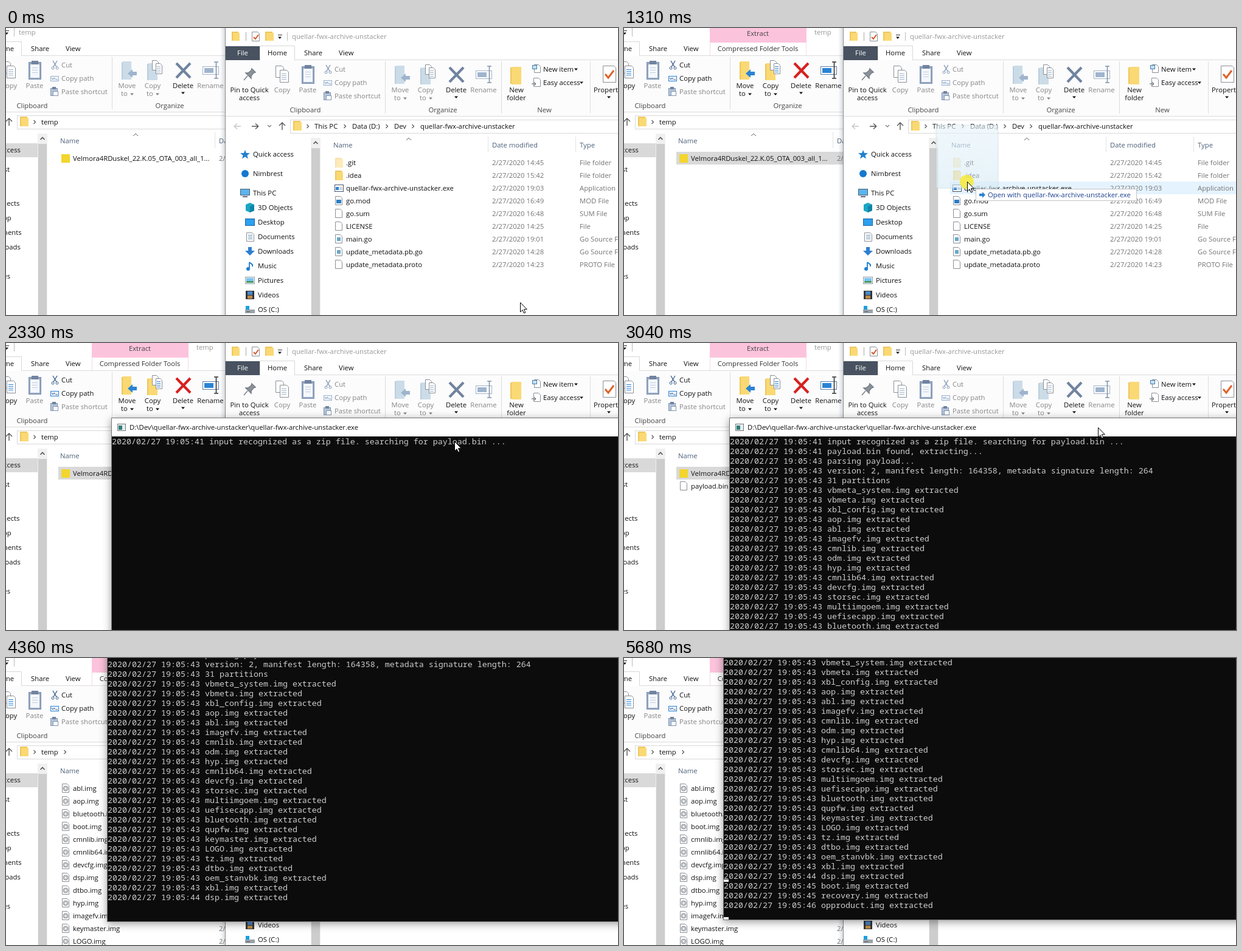
An HTML page that plays this animation: 1006 by 473 pixels, repeating every 5830 ms.

```html
<!DOCTYPE html>
<html lang="en">
<head>
<meta charset="utf-8">
<title>Payload extraction</title>
<style>
html, body { margin: 0; width: 100%; height: 100%; overflow: hidden; background: #fff; }
svg { display: block; width: 100vw; height: 100vh; }
text { font: 11.3px "Open Sans", "Noto Sans", sans-serif; white-space: pre; }
.mid { text-anchor: middle; }
.log text { font: 13.333px "Noto Sans Mono", "DejaVu Sans Mono", monospace; fill: #ccc; }
.shade { filter: drop-shadow(0 3px 7px rgba(0, 0, 0, .4)); }
</style>
</head>
<body>
<svg id="stage" viewBox="0 0 1006 473" preserveAspectRatio="none"></svg>
<script>
const LOOP = 5830, TICK = 77.5;
const INK = '#111', DIM = '#858585', BLUE = '#2b83d4', GOLD = '#fad974';
const TOOL = 'quellar-fwx-archive-unstacker';
const ZIP = 'Velmora4RDuskel_22.K.05_OTA_003_all_1...';

// Drawing helpers
const rect = (x, y, w, h, fill, more = '') =>
  `<rect x="${x}" y="${y}" width="${w}" height="${h}" fill="${fill}" ${more}/>`;
const box = (x, y, w, h, line, fill = '#fff') =>
  rect(x + .5, y + .5, w - 1, h - 1, fill, `stroke="${line}"`);
const path = (d, line, w = 1, fill = 'none') =>
  `<path d="${d}" stroke="${line}" stroke-width="${w}" fill="${fill}"/>`;
const shape = (d, fill) => `<path d="${d}" fill="${fill}"/>`;
const disc = (x, y, r, fill, more = '') =>
  `<circle cx="${x}" cy="${y}" r="${r}" fill="${fill}" ${more}/>`;
const text = (x, y, s, fill = INK, more = '') =>
  `<text x="${x}" y="${y}" fill="${fill}" ${more}>${s}</text>`;
const mid = (x, y, s, fill) => text(x, y, s, fill, 'class="mid"');
const group = (id, body, more = '') => `<g id="${id}" ${more}>${body}</g>`;
const drop = (x, y, fill = INK) => shape(`M${x - 3} ${y - 1.5}h6l-3 3.5z`, fill);
const vline = (x, y, h, c = '#dcdcdc') => rect(x, y, 1, h, c);
const hline = (x, y, w, c = '#dcdcdc') => rect(x, y, w, 1, c);
const angle = (x, y) => path(`M${x - 1.5} ${y - 3}l3 3l-3 3`, '#555', 1.2);
const page = (x, y, w = 12, h = 15) =>
  path(`M${x + .5} ${y + .5}h${w - 4}l3 3v${h - 4}h${1 - w}z`, '#8a8f96', 1, '#fff');
const folder = (x, y, w = 13, h = 16) =>
  rect(x, y, w - 2, h, '#eec65c') + rect(x + 2, y + 2, w - 2, h - 2, GOLD);

function clipboard(x, y) {
  return box(x, y + 3, 21, 29, '#7f92ad', '#93a6c2') + rect(x + 3, y + 7, 15, 22, '#f4f7fb') +
    rect(x + 5, y + 1, 11, 6, '#71839f') +
    [12, 16, 20].map(d => hline(x + 6, y + d, 9, '#c3cede')).join('');
}

function sheets(x, y, line) {
  return page(x, y, 14, 20) + page(x + 7, y + 7, 15, 21) +
    [13, 16, 19, 22].map(d => hline(x + 10, y + d, 8, line)).join('');
}

// Ribbon buttons that depend on a selection
function editTools(on) {
  const ink = on ? INK : DIM, blue = on ? BLUE : '#9fb4cd';
  const gold = on ? GOLD : '#cbdce8', gold2 = on ? '#eec65c' : '#b9cedd';
  const cut = on ? '#3c5f8c' : '#8297b2';
  return sheets(443, 62, blue) + mid(454, 106, 'Copy', ink) +
    path('M526 61l6 10M533 61l-6 10', cut, 1.4) +
    disc(526, 73, 2, 'none', `stroke="${cut}"`) + disc(533, 73, 2, 'none', `stroke="${cut}"`) +
    text(540, 72, 'Cut', ink) +
    box(522, 86, 14, 9, blue, '#eef4fb') + path('M524 89l2 3 2-3 2 3M531 92h3', cut) +
    text(540, 94, 'Copy path', ink) +
    rect(639, 63, 4, 29, gold2) + rect(641, 62, 14, 30, gold) +
    shape('M649 82l8-7v4h7v6h-7v4z', blue) +
    mid(648, 106, 'Move', ink) + text(638, 119, 'to', ink) + drop(656, 116, ink) +
    rect(681, 66, 4, 27, gold2) + rect(683, 65, 15, 28, gold) +
    page(689, 60, 11, 17) + page(695, 65, 11, 18) +
    [70, 73, 76, 79].map(y => hline(697, y, 6, blue)).join('') +
    mid(690, 106, 'Copy', ink) + text(680, 119, 'to', ink) + drop(698, 116, ink) +
    path('M729 65l23 24M752 65l-23 24', on ? '#d6201f' : '#70839f', 4.2) +
    box(772, 70, 27, 14, on ? '#5c7fa8' : '#a3b2c4') + rect(775, 73, 15, 8, blue) +
    path('M791 63h7M794.500 63v27M791 90h7', on ? '#333' : '#8194ac', 1.6) +
    mid(785, 106, 'Rename', ink);
}

function navPane() {
  const icons = [
    shape('M393 201l2 5 6 .3-4.600 3.700 1.600 5.500-5-3.200-5 3.200 1.600-5.500-4.600-3.700 6-.3z', '#2380cf'),
    disc(393, 240, 6, '#1479cf'),
    box(385, 265, 16, 11, '#44607a', '#5db4ea') + rect(389, 277, 8, 2, '#667'),
    shape('M394 291l7-3 7 3v10l-7 3-7-3z', '#1ba6c4') + shape('M401 294l7-3v10l-7 3z', '#1184a8'),
    box(393, 314, 16, 12, '#1b64a5', '#2ba0ee'),
    page(395, 337, 13, 15) + [341, 344, 347].map(y => hline(398, y, 7, '#5b87ad')).join(''),
    shape('M398 361h6v6h5l-8 8-8-8h5z', '#2f7fd0'),
    path('M400 386v10', '#1d7fd0', 1.8) + disc(398, 397, 3, '#1d7fd0') + path('M400 386l5 4v3', '#1d7fd0', 2),
    box(393, 410, 16, 12, '#8b98a4') + rect(395, 412, 12, 5, '#7cc4f0') + rect(395, 417, 12, 3, '#4a9a64'),
    rect(394, 433, 14, 14, '#32353a') + rect(397, 434, 8, 6, '#4a88c8') + rect(397, 441, 8, 5, '#c08b45'),
    rect(393, 464, 16, 6, '#9aa2a9') + rect(395, 467, 6, 1, '#4e5a62') + rect(394, 458, 6, 6, '#18a0e0')
  ];
  const labels = ['Quick access', 'Nimbrest', 'This PC', '3D Objects', 'Desktop', 'Documents',
    'Downloads', 'Music', 'Pictures', 'Videos', 'OS (C:)'];
  return labels.map((s, i) => {
    const y = i < 3 ? 212 + i * 32 : 300 + (i - 3) * 24;
    return icons[i] + text(i < 3 ? 406 : 414, y, s);
  }).join('') + rect(501, 181, 16, 300, '#f0f0f0') + rect(502, 198, 14, 290, '#cdcdcd') +
    path('M505.500 191l3.500-3.500 3.500 3.500', '#555', 1.6);
}

// File rows: [icon, name, date, type]
const kinds = {
  dir: y => folder(541, y - 8),
  faint: y => `<g opacity=".5">${folder(541, y - 8)}</g>`,
  exe: y => box(540, y - 6, 15, 12, '#44566c') + rect(542, y - 2, 5, 5, BLUE) + rect(548, y - 2, 5, 5, '#c9d6e4'),
  mod: y => page(541, y - 8) + rect(543, y - 2, 8, 6, '#2c7ec4'),
  doc: y => page(541, y - 8),
  go: y => page(541, y - 8) + rect(544, y - 3, 6, 6, '#68a8cc'),
  zip: y => rect(540, y - 7, 14, 14, '#f2d52e'),
  img: y => page(541, y - 8) + disc(547, y, 4, '#c3c7cb', 'stroke="#8d9297"') + disc(547, y, 1.200, '#fff')
};
const fileRows = rows => rows.map(([kind, name, date = '2/27/2020 19:05', type = ''], i) => {
  const y = 222 + i * 21;
  return kinds[kind](y) + text(559, y + 4, name) + text(799, y + 4, date, '#747474') +
    text(943, y + 4, type, '#747474');
}).join('');

// Parts shared by both folder windows
const ground = rect(361, 0, 700, 490, '#fff') + rect(361, 53, 700, 92, '#fcfcfd');

function frame() {
  return folder(371, 6, 13, 15) + vline(394, 7, 14, '#aaa') + page(404, 6, 13, 16) +
    path('M407 15l3 3 5-7', '#d4562c', 2) + folder(426, 6, 14, 15) +
    hline(447, 11, 7, '#333') + drop(450, 16) + vline(462, 7, 14, '#bbb') +
    rect(361, 30, 56, 23, '#485260') + mid(389, 45, 'File', '#fff') +
    path('M417.500 53v-23.500h57v23.500', '#d8d8d8') + hline(475, 52, 600) +
    mid(446, 45, 'Home') + text(490, 45, 'Share') + text(547, 45, 'View') +
    path('M404 67l6 6-3 1-4 5 0 4-9-9 4 0 5-4zM397 79l-6 7', '#777e86', 1.500, '#8b929a') +
    mid(400, 106, 'Pin to Quick') + mid(400, 119, 'access') +
    clipboard(486, 60) + mid(496, 106, 'Paste', DIM) +
    box(522, 106, 12, 13, '#8195b0', '#b6c5da') + rect(525, 104, 6, 4, '#71839f') +
    box(526, 111, 9, 8, '#8195b0') + text(540, 116, 'Paste shortcut', DIM) +
    mid(492, 139, 'Clipboard', '#444') + vline(623, 55, 86) +
    mid(740, 106, 'Delete') + drop(740, 114) + mid(718, 139, 'Organize', '#444') +
    vline(814, 55, 86) + hline(361, 145, 700) +
    path('M375 162h11m-11 0l5-4.500m-5 4.500l5 4.500', '#c5c5c5', 1.400) +
    path('M404 162h11m0 0l-5-4.500m5 4.500l-5 4.500', '#555', 1.400) +
    path('M430 160l3 3 3-3', '#777', 1.200) +
    path('M454 168v-12m-5 5l5-5 5 5', '#555', 1.400) +
    box(467, 151, 600, 23, '#d9d9d9') + folder(472, 153, 14, 16) + angle(496, 162) +
    text(538, 197, 'Name', '#4c607a') + text(799, 197, 'Date modified', '#4c607a') +
    text(943, 197, 'Type', '#4c607a') + path('M658 185l4-4 4 4', '#666') +
    vline(792, 179, 26, '#e2e2e2') + vline(936, 179, 26, '#e2e2e2') + navPane();
}

const images = 'abl aop bluetooth boot cmnlib cmnlib64 devcfg dsp dtbo hyp imagefv keymaster LOGO'
  .split(' ').map(n => ['img', n + '.img']);

const leftWindow = ground + rect(361, 197, 140, 23, '#d9d9d9') + frame() +
  text(507, 166, 'temp') + group('crumb', angle(546, 162)) +
  group('idle', text(470, 18, 'temp', '#999') + editTools(false)) +
  group('picked', rect(590, 0, 159, 31, '#fcc3dc') +
    vline(590, 31, 21, '#f3dbe6') + vline(748, 31, 21, '#f3dbe6') + mid(669, 20, 'Extract', '#444') +
    mid(669, 45, 'Compressed Folder Tools', '#333') + text(762, 18, 'temp', '#999') + editTools(true)) +
  rect(535, 211, 300, 21, '#d9d9d9', 'id="mark"') +
  group('zipList', fileRows([['zip', ZIP]])) +
  group('bin', `<g transform="translate(0 21)">${fileRows([['doc', 'payload.bin']])}</g>`) +
  group('imgList', fileRows(images));

const day = '2/27/2020 ';
const rightWindow = ground + frame() + editTools(false) + text(470, 18, TOOL, '#999') +
  rect(829, 65, 6, 27, '#eec65c') + rect(831, 64, 16, 29, GOLD) +
  mid(839, 106, 'New') + mid(839, 119, 'folder') +
  page(868, 60, 11, 14) + box(865, 61, 8, 7, '#4d7fa8', '#bfe0f5') + text(883, 72, 'New item') + drop(937, 68) +
  page(867, 82, 12, 15) + path('M864 92h7m-3-3l3 3-3 3', '#555') + text(883, 94, 'Easy access') + drop(946, 90) +
  mid(885, 139, 'New', '#444') + vline(960, 55, 86) +
  page(981, 62, 22, 28) + path('M985 76l5 6 9-12', '#e0622a', 3) +
  text(966, 106, 'Properties') + drop(991, 114) +
  text(507, 166, 'This PC') + angle(557, 162) + text(569, 166, 'Data (D:)') + angle(626, 162) +
  text(638, 166, 'Dev') + angle(669, 162) + text(681, 166, TOOL) +
  rect(536, 253, 480, 21, '#e5f3ff', 'id="target"') +
  fileRows([
    ['faint', '.git', day + '14:45', 'File folder'],
    ['dir', '.idea', day + '15:42', 'File folder'],
    ['exe', TOOL + '.exe', day + '19:03', 'Application'],
    ['mod', 'go.mod', day + '16:49', 'MOD File'],
    ['doc', 'go.sum', day + '16:48', 'SUM File'],
    ['doc', 'LICENSE', day + '14:25', 'File'],
    ['go', 'main.go', day + '19:01', 'Go Source File'],
    ['go', 'update_metadata.pb.go', day + '14:28', 'Go Source File'],
    ['doc', 'update_metadata.proto', day + '14:23', 'PROTO File']
  ]);

// Console
const parts = ('vbmeta_system vbmeta xbl_config aop abl imagefv cmnlib odm hyp cmnlib64 devcfg storsec ' +
  'multiimgoem uefisecapp bluetooth qupfw keymaster LOGO tz dtbo oem_stanvbk xbl dsp boot recovery opproduct').split(' ');
const log = ['input recognized as a zip file. searching for payload.bin ...', 'payload.bin found, extracting...',
  'parsing payload...', 'version: 2, manifest length: 164358, metadata signature length: 264', '31 partitions',
  ...parts.map(n => n + '.img extracted')];
const second = i => i < 2 ? 41 : i < 27 ? 43 : i < 28 ? 44 : i < 30 ? 45 : 46;

const consoleWindow = rect(173, 123, 1000, 512, '#777', 'class="shade"') +
  rect(174, 124, 998, 30, '#fff') + rect(174, 154, 998, 480, '#0c0c0c') +
  box(183, 133, 14, 12, '#777', '#e8eef2') + rect(185, 136, 6, 7, '#2f7f79') +
  text(203, 143, `D:\\Dev\\${TOOL}\\${TOOL}.exe`) +
  `<g clip-path="url(#screen)">${group('log',
    log.map((s, i) => text(174, 167 + i * 16, `2020/02/27 19:05:${second(i)} ${s}`, '#ccc')).join('') +
    group('caret', rect(174, 662, 8, 4, '#f2f2f2') + rect(174, 600, 8, 4, '#f2f2f2')), 'class="log"')}</g>`;

const ghost = rect(-51, -93, 102, 104, 'url(#pale)', 'stroke="#9fbccb" stroke-opacity=".35" rx="2"');
const tip = box(14, 12, 265, 20, '#c4c4c4') + shape('M20 20h5v-3l5 5-5 5v-3h-5z', BLUE) +
  text(34, 26, 'Open with', '#1d3f8f') + text(92, 26, TOOL + '.exe', '#1d3f8f');
const arrow = path('M.5.5V16L4 12.700 6.400 18 8.800 17 6.500 11.700H11.300Z', '#000', 1, '#fff');

const stage = document.getElementById('stage');
stage.innerHTML = `<defs>
  <linearGradient id="pale" x2="0" y2="1"><stop stop-color="#e6f3fa" stop-opacity=".6"/>
    <stop offset="1" stop-color="#d9ebf5" stop-opacity=".65"/></linearGradient>
  <linearGradient id="edge"><stop stop-color="#456" stop-opacity="0"/>
    <stop offset="1" stop-color="#456" stop-opacity=".2"/></linearGradient>
  <clipPath id="screen"><rect x="174" y="154" width="998" height="480"/></clipPath></defs>
  <g transform="translate(-449 -7)">${leftWindow}</g>
  ${rect(352, 0, 8, 473, 'url(#edge)')}${rightWindow}${vline(360, 0, 473, '#8c8c8c')}` +
  group('console', consoleWindow) +
  group('pointer', group('ghost', ghost) + group('tip', tip) +
    disc(-.5, .5, 11.500, '#f8ea2a', 'id="press" opacity=".8"') + arrow);

const el = {};
stage.querySelectorAll('g[id], rect[id], circle[id]').forEach(n => el[n.id] = n);
const lines = [...el.log.querySelectorAll('text')];

// Timing: [ms, values...]
const route = [[-10, 845, 452], [532, 283, 216], [765, 283, 216], [842, 292, 224], [920, 306, 235],
  [1307, 564, 253], [1540, 570, 255], [2142, 570, 255], [2385, 779, 139], [3200, 779, 139],
  [3240, 777, 139], [3780, 777, 139], [3820, 777, 141]];
const drag = [[0, 0, 0], [3970, 0, -2], [4050, 0, -18], [4130, -2, -60], [4210, -4, -115], [4280, -6, -166],
  [4360, -7, -200], [4440, -8, -202], [4520, -9, -203], [4750, -10, -203]];
const printed = [[0, 0], [2330, 1], [2410, 2], [2790, 3], [2870, 5], [2950, 12], [3040, 27],
  [3580, 28], [4750, 29], [4900, 30], [5600, 31]];

const hold = (keys, t) => keys.filter(k => k[0] <= t).pop().slice(1);
function glide(keys, t) {
  const i = keys.findIndex(k => k[0] > t);
  if (i < 0) return keys[keys.length - 1].slice(1);
  const a = keys[i - 1], b = keys[i], p = (t - a[0]) / (b[0] - a[0]), e = p * p * (3 - 2 * p);
  return [a[1] + (b[1] - a[1]) * e, a[2] + (b[2] - a[2]) * e];
}
const show = (node, on) => { node.style.display = on ? '' : 'none'; };
const move = (node, x, y) => node.setAttribute('transform', `translate(${x} ${y})`);

function draw(t) {
  const q = Math.floor((t + 10) / TICK) * TICK - 10;
  const [x, y] = glide(route, q).map(Math.round);
  const [dx, dy] = hold(drag, t), [count] = hold(printed, t);
  const picked = t >= 770, listed = t >= 3580, carrying = t >= 850 && t < 1940;
  const over = t >= 1230 && t < 2170 && x > 530;

  show(el.idle, !picked);
  show(el.picked, picked);
  show(el.mark, !listed && t >= 470);
  el.mark.setAttribute('fill', picked ? '#d9d9d9' : '#e5f3ff');
  show(el.zipList, !listed);
  show(el.bin, t >= 2410 && !listed);
  show(el.imgList, listed);
  show(el.crumb, t >= 3820);
  show(el.target, over);

  show(el.console, t >= 2170);
  el.console.setAttribute('opacity', Math.min(1, .4 + Math.max(0, q - 2150) / 250));
  move(el.console, dx, dy);
  lines.forEach((n, i) => show(n, i < count));
  move(el.log, 0, -16 * Math.max(0, count - 29));
  show(el.caret, t >= 5680);

  move(el.pointer, x + dx, y + dy);
  show(el.ghost, carrying);
  show(el.tip, carrying && over);
  show(el.press, t >= 770 && t < 1940 || t >= 3970 && t < 4520);
}

function loop() {
  draw(performance.now() % LOOP);
  requestAnimationFrame(loop);
}
loop();
</script>
</body>
</html>
```
